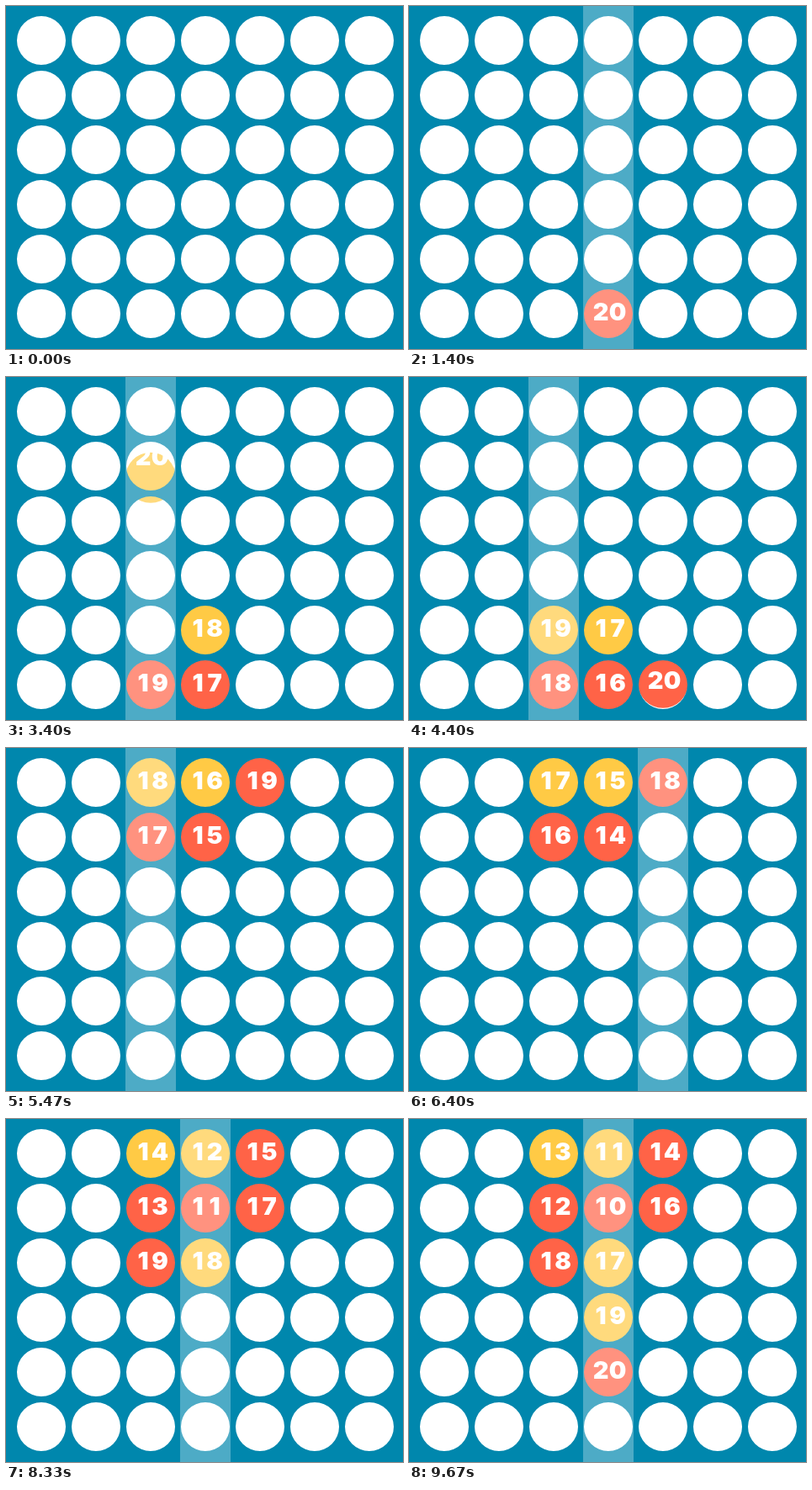
Animation of 472x408 px, one loop 9.74 s. Source, as an HTML page with a canvas:

```html
<!DOCTYPE html>
<html lang="en">
<head>
<meta charset="utf-8">
<title>Gravity four in a row</title>
<style>
  html, body { margin: 0; width: 100%; height: 100%; overflow: hidden; background: #0087ad; }
  canvas { display: block; }
</style>
</head>
<body>
<canvas id="stage" width="472" height="408"></canvas>
<script>
const LOOP = 9740, MOVE = 500, POINTER_STEP = 70, POINTER_LEAD = 370;
const COLS = 7, ROWS = 6, CELL = 65, HOLE = 29, DISC = 30, DIGIT = 20;
const BLUE = '#0087ad', RED = '#ff6347', YELLOW = '#ffca45';
const FLIP = '^', FLIP_POINTER = 2;
const ctx = document.getElementById('stage').getContext('2d');
const center = i => 41 + CELL * i;
const colX = c => center(c) + 1;

// Columns in playing order; play is slower before gravity flips than after.
const script = [...'33224^43233'];
const flipTurn = script.indexOf(FLIP);
const turnTime = i => i <= flipTurn ? 770 + 797 * i : 6374 + 650 * (i - flipTurn - 1);
const turns = script.map((col, i) => ({ time: turnTime(i), flip: col === FLIP, col: Number(col) }));

// The pointer enters from the right and walks column by column ahead of each turn.
function walkPointer() {
  const hovers = [];
  let at = COLS;
  const goTo = (col, arrival) => {
    while (at !== col) {
      at += Math.sign(col - at);
      hovers.push({ time: arrival - POINTER_STEP * Math.abs(col - at), col: at });
    }
  };
  for (const turn of turns) goTo(turn.flip ? FLIP_POINTER : turn.col, turn.time - POINTER_LEAD);
  goTo(3, LOOP - POINTER_STEP);
  return hovers;
}

function playGame() {
  const discs = [], stacks = Array.from({ length: COLS }, () => []);
  let up = false;
  const restY = height => center(up ? height : ROWS - 1 - height);
  turns.forEach(({ time, flip, col }, turn) => {
    if (flip) {
      up = !up;
      for (const stack of stacks) {
        stack.reverse().forEach((disc, i) => {
          const from = disc.moves.at(-1).to;
          disc.moves.push({ time, from, textFrom: from, to: restY(i) });
        });
      }
      return;
    }
    const from = center(up ? ROWS : -1);
    const move = { time, from, textFrom: from - center(0), to: restY(stacks[col].length) };
    const disc = { turn, time, x: colX(col), color: turn % 2 ? YELLOW : RED, moves: [move] };
    stacks[col].push(disc);
    discs.push(disc);
  });
  return discs;
}

const hovers = walkPointer();
const discs = playGame();
const latest = (list, t) => list.filter(item => item.time <= t).at(-1);

function ease(u) {
  u = Math.max(0, Math.min(1, u));
  return u < 0.5 ? 4 * u ** 3 : 1 - 4 * (1 - u) ** 3;
}

const board = new Path2D();
board.rect(0, 0, 472, 408);
for (let c = 0; c < COLS; c++) {
  for (let r = 0; r < ROWS; r++) {
    board.moveTo(colX(c) + HOLE, center(r));
    board.arc(colX(c), center(r), HOLE, 0, Math.PI * 2);
  }
}

function drawDisc(disc, t, turnsTaken) {
  const move = latest(disc.moves, t);
  const p = ease((t - move.time) / MOVE);
  const glide = from => from + (move.to - from) * p;
  ctx.fillStyle = disc.color;
  ctx.beginPath();
  ctx.arc(disc.x, glide(move.from), DISC, 0, Math.PI * 2);
  ctx.fill();

  // Each digit is centred in a cell of equal width.
  ctx.fillStyle = '#fff';
  const count = String(20 - (turnsTaken - 1 - disc.turn));
  [...count].forEach((digit, i) => {
    ctx.fillText(digit, disc.x + 1 + (i - 0.5) * DIGIT, glide(move.textFrom) + 8);
  });
}

function draw(t) {
  ctx.fillStyle = '#fff';
  ctx.fillRect(0, 0, 472, 408);
  ctx.font = '900 29px Inter, "Open Sans", sans-serif';
  ctx.textAlign = 'center';
  const turnsTaken = turns.filter(({ time }) => time <= t).length;
  for (const disc of discs) if (disc.time <= t) drawDisc(disc, t, turnsTaken);

  ctx.fillStyle = BLUE;
  ctx.fill(board, 'evenodd');

  const hover = latest(hovers, t);
  if (hover) {
    ctx.fillStyle = 'rgba(255, 255, 255, 0.3)';
    ctx.fillRect(colX(hover.col) - 30, 0, 60, 408);
  }
}

const start = performance.now();
function frame() {
  draw((performance.now() - start) % LOOP);
  requestAnimationFrame(frame);
}
frame();
</script>
</body>
</html>
```
